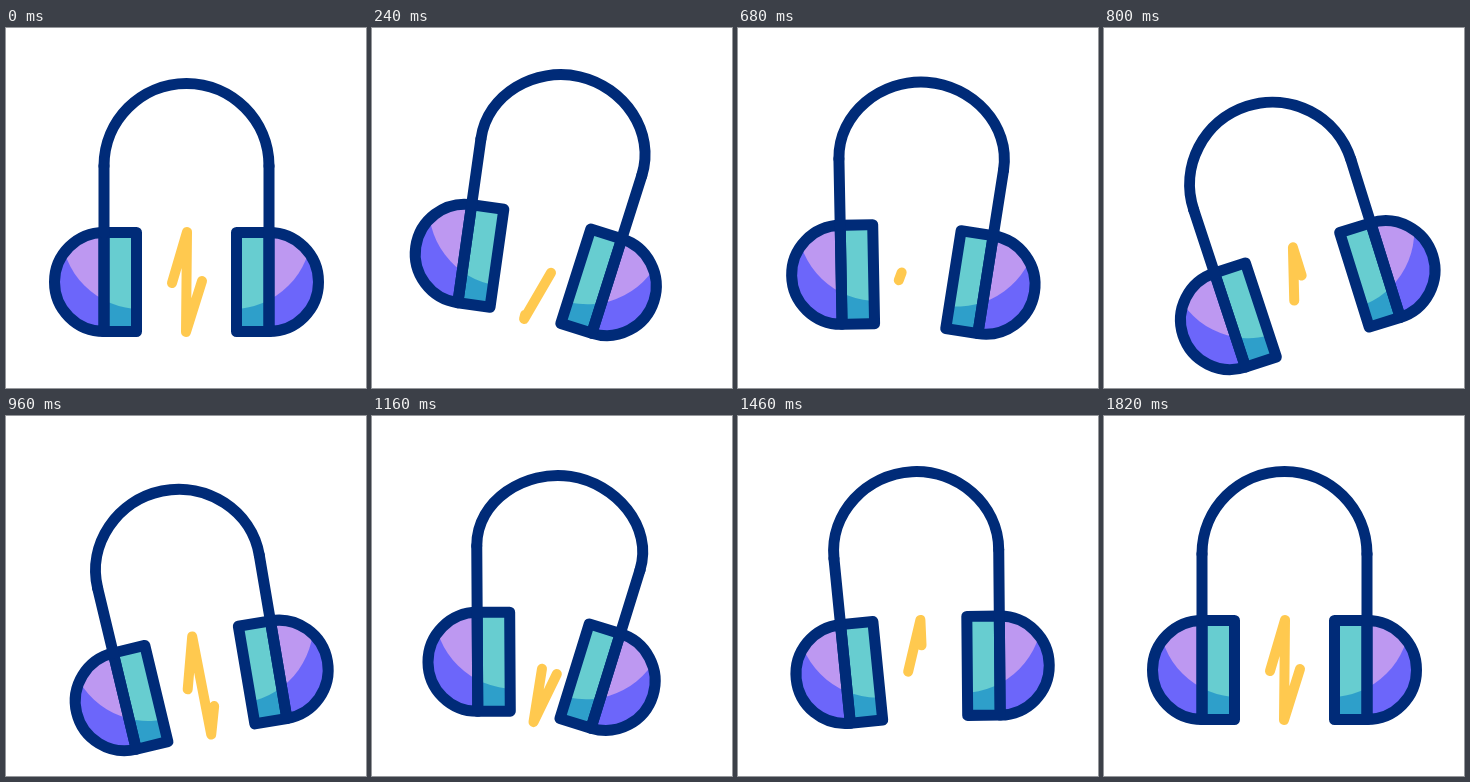
These frames come from a looping animation (360x360 px, 2400 ms). An HTML page:

```html
<!DOCTYPE html>
<html lang="en">
<head>
<meta charset="utf-8">
<title>Headphones</title>
<style>
  html, body { margin: 0; width: 100%; height: 100%; overflow: hidden; background: #fff; }
  svg { display: block; width: 100%; height: 100%; }
  .line { fill: none; stroke: #002b78; stroke-width: 11; stroke-linecap: round; stroke-linejoin: round; }
  #bolt { fill: none; stroke: #ffc94f; stroke-width: 10; stroke-linecap: round; stroke-linejoin: round; }
</style>
</head>
<body>
<svg viewBox="0 0 360 360">
  <defs>
    <path id="shell" d="M98 204.5A49.5 49.5 0 0 0 98 303.5Z"/>
    <path id="pad" d="M98 204.5H130.5V303.5H98Z"/>
    <clipPath id="inShell"><use href="#shell"/></clipPath>
    <clipPath id="inPad"><use href="#pad"/></clipPath>
    <g id="arm">
      <use href="#shell" fill="#6c66fa"/>
      <circle cx="135" cy="201" r="80" fill="#bd98f1" clip-path="url(#inShell)"/>
      <use href="#pad" fill="#2e9fca"/>
      <circle cx="135" cy="201" r="80" fill="#67cdd0" clip-path="url(#inPad)"/>
      <use href="#shell" class="line"/>
      <use href="#pad" class="line"/>
      <path class="line" d="M98 138V205"/>
    </g>
  </defs>
  <g id="body">
    <path id="band" class="line"/>
    <path id="bolt" d="M166 255L181 204L180 304L196 253"/>
    <use id="left" href="#arm"/>
    <g transform="translate(361 0) scale(-1 1)"><use id="right" href="#arm"/></g>
  </g>
</svg>
<script>
  const LOOP = 2400, STEP = 20;
  const FIRST_SWING = 515, SWING = 327, BOLT_BEAT = 1000 / 3;
  const swingAngles = [28.5, -20, 8.5, -3.5, 0];
  const HANDLE = 45.6; // makes the band a half circle when the arms are parallel

  const $ = id => document.getElementById(id);
  const body = $('body'), band = $('band'), bolt = $('bolt'), arms = [$('left'), $('right')];
  const boltLength = bolt.getTotalLength();

  const clamp = u => Math.min(1, Math.max(0, u));
  const smooth = u => u * u * (3 - 2 * u);
  const ramp = (t, from, to) => smooth(clamp((t - from) / (to - from)));
  const hump = (t, from, top, to) => ramp(t, from, top) - ramp(t, top, to);

  function swing(t) {
    let angle = 0, from = 0, to = FIRST_SWING;
    for (const target of swingAngles) {
      angle += (target - angle) * ramp(t, from, to);
      from = to;
      to += SWING;
      if (t < from) break;
    }
    return angle;
  }

  // The band leaves each hinge in line with its arm.
  function drawBand(pinch) {
    const rad = pinch * Math.PI / 180;
    const out = HANDLE * Math.sin(rad), y = 138 - HANDLE * Math.cos(rad);
    band.setAttribute('d', `M98 138C${98 - out} ${y} ${180.5 - HANDLE} 55.5 180.5 55.5` +
      `S${263 + out} ${y} 263 138`);
  }

  // Erase, then draw and erase again, then draw for good.
  function drawBolt(t) {
    const beat = t / BOLT_BEAT;
    const cycle = Math.min(2, Math.floor(beat / 2));
    const from = cycle < 2 ? clamp(beat - 3 * cycle) : 0;
    const to = cycle ? clamp(beat - 2 * cycle) : 1;
    const shown = (to - from) * boltLength;
    bolt.style.display = shown > 0.5 ? '' : 'none';
    bolt.setAttribute('stroke-dasharray', `${shown} ${boltLength * 2}`);
    bolt.setAttribute('stroke-dashoffset', -from * boltLength);
  }

  function draw(t) {
    const y = -21.5 * hump(t, 0, 510, 860) + 20 * hump(t, 510, 860, 1270);
    const pinch = 10.5 * hump(t, 0, 510, 840) + 8.8 * hump(t, 870, 1165, 1625);
    body.setAttribute('transform', `translate(0 ${y}) rotate(${swing(t)} 180.5 178)`);
    for (const arm of arms) arm.setAttribute('transform', `rotate(${-pinch} 98 138)`);
    drawBand(pinch);
    drawBolt(t);
  }

  const begin = performance.now();
  function tick() {
    const t = (performance.now() - begin) % LOOP;
    draw(Math.floor(t / STEP) * STEP);
    requestAnimationFrame(tick);
  }
  tick();
</script>
</body>
</html>
```
